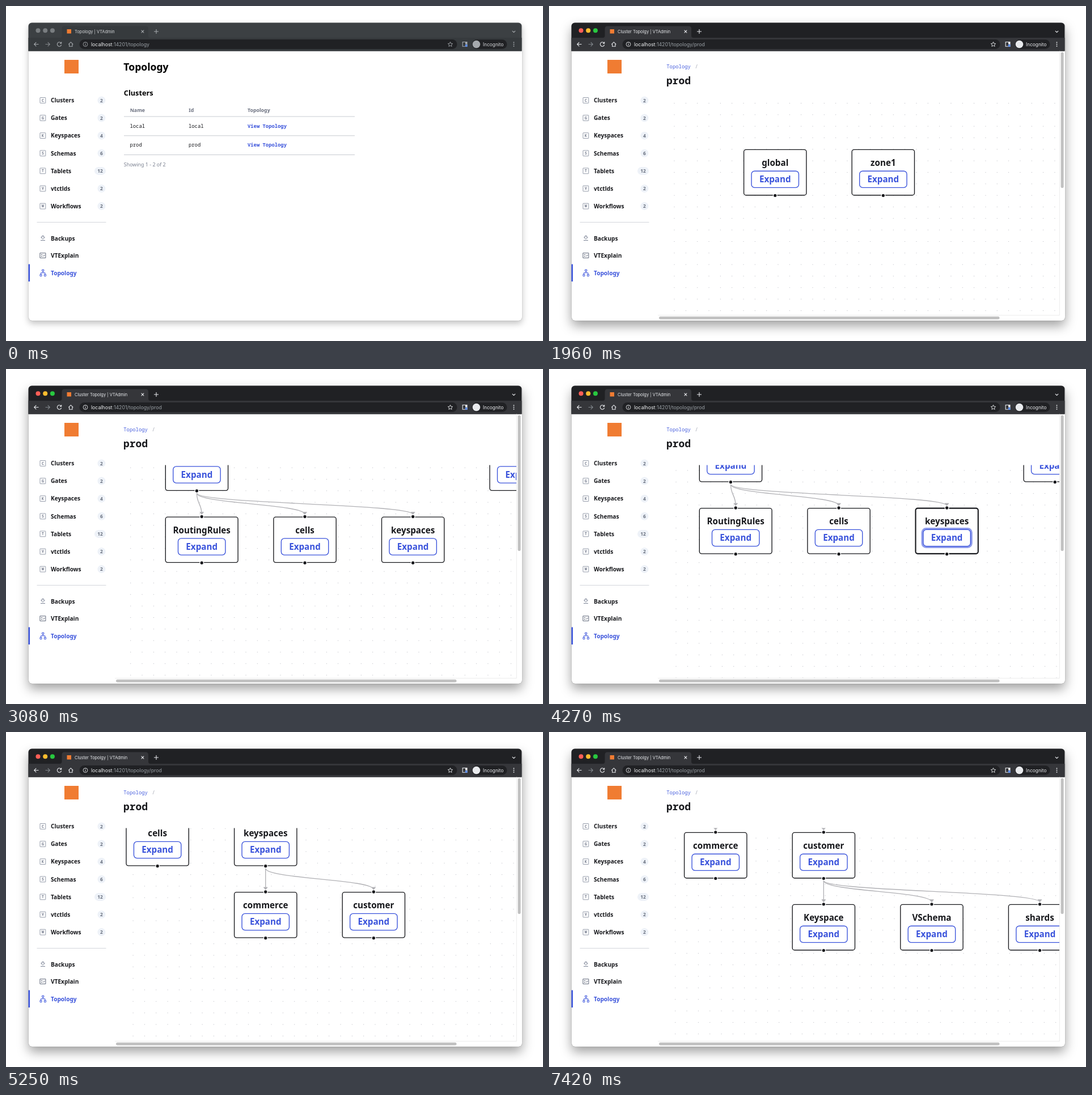
Recreate the animation shown at these times as an HTML page. Size 947 by 591 pixels, loop 7770 ms.

```html
<!DOCTYPE html>
<html lang="en">
<head>
<meta charset="utf-8">
<title>Topology</title>
<style>
html, body { margin: 0; width: 100%; height: 100%; overflow: hidden; background: #fff; }
#stage {
  position: relative; width: 947px; height: 591px; overflow: hidden;
  --strip: #202124; --tab: #35363a; --icon: #e8eaed; --dim: #80868b; --text: #e8eaed;
  --close: #ff5f57; --min: #febc2e; --max: #28c840;
  --shadow: 0 9px 20px rgba(0,0,0,.38), 0 0 1px rgba(0,0,0,.5);
}
#stage.idle {
  --strip: #3c4043; --tab: #363a3d; --icon: #a5a9ad; --dim: #84888c; --text: #d5d7da;
  --close: #797d80; --min: #797d80; --max: #797d80;
  --shadow: 0 5px 12px rgba(0,0,0,.25), 0 0 1px rgba(0,0,0,.4);
}
#win {
  position: absolute; left: 39.5px; top: 29.5px; width: 870px; height: 525px;
  border-radius: 6px; background: #fff; box-shadow: var(--shadow);
}
svg { position: absolute; left: 0; top: 0; }
text { font-family: "Noto Sans", sans-serif; white-space: pre; }
.ui { font-family: Inter, sans-serif; }
.mono { font-family: "Noto Sans Mono", monospace; }
.nav { font-size: 10.15px; font-weight: 600; fill: #17181c; }
.th { font-size: 8.8px; font-weight: 600; fill: #6c7180; }
.td { font-size: 8.85px; fill: #17181c; }
.node { font-size: 15.2px; font-weight: 700; text-anchor: middle; fill: #17181c; }
.ic { fill: none; stroke: var(--icon); stroke-width: 1.1; }
.side { fill: none; stroke: #7c8496; stroke-width: 1; }
.blue { fill: #3a53db; }
.edge { fill: none; stroke: #b1b1b5; stroke-width: 1.36; }
</style>
</head>
<body>
<div id="stage">
  <div id="win"></div>
  <svg id="art" width="947" height="591" viewBox="0 0 947 591"></svg>
</div>
<script>
const LOOP = 7770, TICK = 70;
const BLUE = '#3a53db', INK = '#17181c';
const NODE_W = 111.5, NODE_H = 81.5, COL = 190.6, ROW = 127, GAP = 20.33;

const stage = document.getElementById('stage');
const art = document.getElementById('art');

const text = (x, y, s, cls = '', more = '') => `<text x="${x}" y="${y}" class="${cls}" ${more}>${s}</text>`;
const rect = (x, y, w, h, r, fill, more = '') =>
  `<rect x="${x}" y="${y}" width="${w}" height="${h}" rx="${r}" fill="${fill}" ${more}/>`;
const dot = (x, y, r, fill, more = '') => `<circle cx="${x}" cy="${y}" r="${r}" fill="${fill}" ${more}/>`;
const path = (d, cls, more = '') => `<path d="${d}" class="${cls}" ${more}/>`;
const line = (x1, x2, y, color) => path(`M${x1} ${y}H${x2}`, '', `stroke="${color}" stroke-width="1"`);

function browser() {
  const lights = ['close', 'min', 'max'].map((c, i) => dot(56.5 + i * 12.7, 43.2, 4, `var(--${c})`)).join('');
  const kebab = [64.3, 67.5, 70.7].map(y => dot(895.5, y, .95, 'var(--icon)')).join('');
  return `
    <path d="M39.5 79.5V35.5a6 6 0 0 1 6-6H903.5a6 6 0 0 1 6 6V79.5Z" fill="var(--strip)"/>
    <path d="M95 56q3.5 0 3.5-4V40q0-4.5 4.5-4.5H246.500q4.500 0 4.500 4.500V52q0 4 3.500 4Z" fill="var(--tab)"/>
    ${rect(39.5, 56, 870, 23.5, 0, 'var(--tab)')}
    ${lights}
    ${rect(107.5, 41, 7.5, 7.5, 0, '#f07c32')}
    ${text(121, 47.7, 'Topology | VTAdmin', 'ui', 'id="tab" font-size="7.4" fill="var(--text)"')}
    ${path('M238.600 42.700l4.600 4.600m0-4.600l-4.600 4.600M261 45h8m-4-4v8M892.800 43.800l2.700 2.700 2.700-2.700', 'ic')}
    ${path('M57.500 67.500H49.700m3.600-3.600l-3.600 3.600 3.600 3.600', 'ic')}
    ${path('M69.500 67.500h7.800m-3.600-3.600l3.600 3.600-3.600 3.600', 'ic', 'style="stroke:var(--dim)"')}
    ${path('M97 65.300a3.700 3.700 0 1 0 .6 3.200M97.700 63.200v2.700h-2.700', 'ic')}
    ${path('M110.300 67.600l4-3.900 4 3.900M111.600 67v4.200h5.400V67', 'ic')}
    ${rect(129.5, 59, 666, 17, 8.5, '#202124')}
    ${dot(140, 67.5, 3.9, 'none', 'class="ic" style="stroke-width:.9"')}
    ${path('M140 67v2.600m0-4.500v1', 'ic')}
    <text id="url" x="150" y="70.700" class="ui" font-size="8.75" fill="#9aa0a6"><tspan fill="#f1f3f4">localhost</tspan>:14201/topology</text>
    ${path('M783.500 63.400l1.200 2.700 3 .3-2.200 2 .6 2.900-2.600-1.500-2.600 1.500.6-2.900-2.200-2 3-.3Z', 'ic', 'style="stroke-width:.9"')}
    ${path('M805.200 63.500h7.800v7.800h-7.800Z', 'ic')}
    ${rect(810, 63.5, 3, 4, 0, 'var(--icon)')}${rect(809.8, 68, 3.8, 3.8, 0, '#5b8def')}
    ${rect(822, 59.2, 61.5, 16.6, 8.3, '#202124')}
    ${dot(829.5, 67.5, 6.8, 'var(--icon)')}
    ${text(841, 70.5, 'Incognito', 'ui', 'font-size="8.3" fill="var(--text)"')}
    ${kebab}`;
}

function sidebar() {
  const rows = [['Clusters', 2], ['Gates', 2], ['Keyspaces', 4], ['Schemas', 6], ['Tablets', 12], ['vtctlds', 2], ['Workflows', 2]];
  const list = rows.map(([name, n], i) => {
    const y = 166.4 + i * 31.12, w = n > 9 ? 20 : 14, x = n > 9 ? 166 : 168.4;
    return rect(60, y - 4.9, 9.8, 9.8, .5, 'none', 'stroke="#8a91a1" stroke-width=".9"') +
      text(64.9, y + 2.3, name[0].toUpperCase(), 'mono', 'font-size="6.4" font-weight="600" fill="#6c7386" text-anchor="middle"') +
      text(79, y + 3.8, name, 'nav') +
      rect(x - w / 2, y - 7, w, 14, 7, '#eef2f8') +
      text(x, y + 3.1, n, '', 'font-size="8.4" font-weight="600" fill="#68707f" text-anchor="middle"');
  }).join('');
  const tools = ['Backups', 'VTExplain', 'Topology'].map((name, i) =>
    text(79, 413.8 + i * 30.4, name, 'nav', i === 2 ? `style="fill:${BLUE}"` : '')).join('');
  return `
    ${rect(103, 95, 25, 24, 0, '#f07c32')}
    ${list}
    ${line(54.5, 176.5, 381.5, '#d3d6dc')}
    ${tools}
    ${path('M61 413.500h8M63.600 405.500h2.800v2.600h2l-3.400 3.300-3.400-3.300h2Z', 'side')}
    ${path('M59.900 435.800h10v8.600h-10ZM61.800 438.500h2.400m-2.400 3h2.400M65.300 440.200l1.200 1.200 2.200-2.500', 'side', 'style="stroke:#5f6779"')}
    ${path('M63.700 465h3v3h-3ZM60 473.500h3v3h-3ZM67.400 473.500h3v3h-3ZM65.200 468v2.700M61.500 473.500v-2.800h7.400v2.800', 'side', `style="stroke:${BLUE}"`)}
    ${rect(39.5, 455.5, 2.6, 30.5, 0, BLUE)}`;
}

function listPage() {
  const row = (name, y) => text(218.5, y, name, 'mono td') + text(322, y, name, 'mono td') +
    text(426, y, 'View Topology', 'mono td', `style="font-weight:600;fill:${BLUE}"`);
  return `
    ${text(207.3, 113.7, 'Topology', '', 'font-size="17.6" font-weight="700"')}
    ${text(207.8, 157.6, 'Clusters', '', 'font-size="12.7" font-weight="700"')}
    ${text(218.7, 187.2, 'Name', 'th')}${text(322.3, 187.2, 'Id', 'th')}${text(426, 187.2, 'Topology', 'th')}
    ${row('local', 214.8)}${row('prod', 248.4)}
    ${[195, 228.8, 262.5].map(y => line(208, 615, y, '#c8cbd1')).join('')}
    ${text(207.8, 282.5, 'Showing 1 - 2 of 2', '', 'font-size="8.9" fill="#7b8190"')}`;
}

function graphPage() {
  return `
    ${text(207.3, 110.2, 'Topology', 'mono', 'font-size="8.9" fill="#4a61de"')}
    ${text(257.5, 110.2, '/', 'mono', 'font-size="8.9" fill="#a3a8b4"')}
    ${text(207, 138.2, 'prod', 'mono', 'font-size="17.9" font-weight="600" fill="#17181c"')}
    <defs>
      <clipPath id="pane"><rect x="207.500" y="169.500" width="692.500" height="376"/></clipPath>
      <pattern id="dots" width="${GAP}" height="${GAP}" patternUnits="userSpaceOnUse">
        ${dot(GAP / 2, GAP / 2, .6, '#a6a9b2')}
      </pattern>
    </defs>
    <g clip-path="url(#pane)">
      ${rect(207.5, 169.5, 692.5, 376, 0, 'url(#dots)')}
      <g id="graph"></g>
    </g>
    ${path('M900.500 79.500V545.500M192 545.500H900.500', '', 'stroke="#ececec" fill="none"')}
    ${rect(902.6, 81.5, 5, 239.5, 2.5, '#c1c1c1')}
    ${rect(194, 547.7, 600.5, 5, 2.5, '#c1c1c1')}`;
}

// name, column, row, parent; each step opens one more node
const steps = [
  [['global', 0, 0], ['zone1', 1, 0]],
  [['RoutingRules', 0, 1, 'global'], ['cells', 1, 1, 'global'], ['keyspaces', 2, 1, 'global'], ['zone1', 3, 0]],
  [['commerce', 2, 2, 'keyspaces'], ['customer', 3, 2, 'keyspaces'], ['zone1', 4, 0]],
  [['Keyspace', 3, 3, 'customer'], ['VSchema', 4, 3, 'customer'], ['shards', 5, 3, 'customer'], ['zone1', 6, 0]]
];
const openAt = [840, 2520, 4480, 5880];
const focus = [['global', 2240, 2520], ['keyspaces', 3780, 4480], ['customer', 5670, 5880]];

function drawNode(n, active) {
  const { name, x, y, w, cx, parent } = n;
  const bx = cx - 41.7, by = y + 38.4;
  const knob = ky => dot(cx, ky, 3.3, INK, 'stroke="#fff" stroke-width="1.3"');
  return rect(x + .6, y + .6, w - 1.2, NODE_H - 1.2, 3.8, '#fff', `stroke="${INK}" stroke-width="${active ? 2.1 : 1.36}"`) +
    text(cx, y + 29.2, name, 'node') +
    (active ? rect(bx - 1.9, by - 1.9, 87.2, 33, 7, 'none', 'stroke="#8f9cec" stroke-width="3"') : '') +
    rect(bx, by, 83.4, 29.2, 5.5, '#fff', `stroke="${BLUE}" stroke-width="1.36"`) +
    text(cx, y + 58.4, 'Expand', 'node', `style="fill:${BLUE}"`) +
    (parent ? knob(y) : '') + knob(y + NODE_H);
}

function drawEdge(a, b) {
  const y1 = a.y + NODE_H + 4, y2 = b.y - 3.8, m = (y1 + y2) / 2;
  return path(`M${a.cx} ${y1}C${a.cx} ${m} ${b.cx} ${m} ${b.cx} ${y2}`, 'edge') +
    path(`M${b.cx} ${y2}l-3.400-4.200h6.800Z`, '', 'fill="#b1b1b5" stroke="#b1b1b5" stroke-width=".8"');
}

function drawGraph(level, active) {
  const nodes = {};
  steps.slice(0, level + 1).flat().forEach(([name, col, row, parent]) => {
    const w = name === 'RoutingRules' ? 129 : NODE_W, x = col * COL;
    nodes[name] = { name, parent, w, x, y: row * ROW, cx: x + w / 2 };
  });
  const all = Object.values(nodes);
  return all.filter(n => n.parent).map(n => drawEdge(nodes[n.parent], n)).join('') +
    all.map(n => drawNode(n, n.name === active)).join('');
}

// time, x, y, easing towards this point
const smooth = p => p * p * (3 - 2 * p), out = p => 1 - (1 - p) ** 2, flat = p => p;
const pan = [
  [1330, 490, 366], [1960, 343, 252.8, smooth],
  [2730, 343, 252.8, flat], [3080, 280.7, 133.5, smooth], [3290, 264.7, 118, out],
  [4830, 264.7, 118, flat], [5250, 20.8, 28, smooth], [5320, 19.5, 26.5, flat],
  [6300, 19.5, 26.5, flat], [6440, 8.8, 15, flat], [7000, -143.2, -77.2, out]
];

function panAt(t) {
  const i = pan.findIndex(k => k[0] > t);
  if (i === 0) return pan[0].slice(1, 3);
  if (i < 0) return pan[pan.length - 1].slice(1, 3);
  const [t0, x0, y0] = pan[i - 1], [t1, x1, y1, ease] = pan[i];
  const p = ease((t - t0) / (t1 - t0));
  return [x0 + (x1 - x0) * p, y0 + (y1 - y0) * p];
}

art.innerHTML = browser() + sidebar() +
  `<g id="list">${listPage()}</g><g id="detail">${graphPage()}</g>`;
const $ = id => document.getElementById(id);
const list = $('list'), detail = $('detail'), graph = $('graph'), dots = $('dots');
const tab = $('tab'), path2 = $('url').lastChild;
let shown = '';

function render(now) {
  const t = Math.floor((now % LOOP) / TICK) * TICK;
  const level = openAt.filter(o => t >= o).length - 1;
  const ring = focus.find(([, a, b]) => t >= a && t < b);
  const key = level + (ring ? ring[0] : '');
  stage.classList.toggle('idle', t < 70);
  if (key !== shown) {
    shown = key;
    const open = level >= 0;
    list.style.display = open ? 'none' : '';
    detail.style.display = open ? '' : 'none';
    tab.textContent = open ? 'Cluster Topolgy | VTAdmin' : 'Topology | VTAdmin';
    path2.textContent = ':14201/topology' + (open ? '/prod' : '');
    graph.innerHTML = open ? drawGraph(level, ring && ring[0]) : '';
  }
  const [x, y] = panAt(t);
  graph.setAttribute('transform', `translate(${x} ${y})`);
  dots.setAttribute('x', x - GAP / 2);
  dots.setAttribute('y', y - GAP / 2);
}

const start = performance.now();
function frame() {
  render(performance.now() - start);
  requestAnimationFrame(frame);
}
frame();
</script>
</body>
</html>
```
